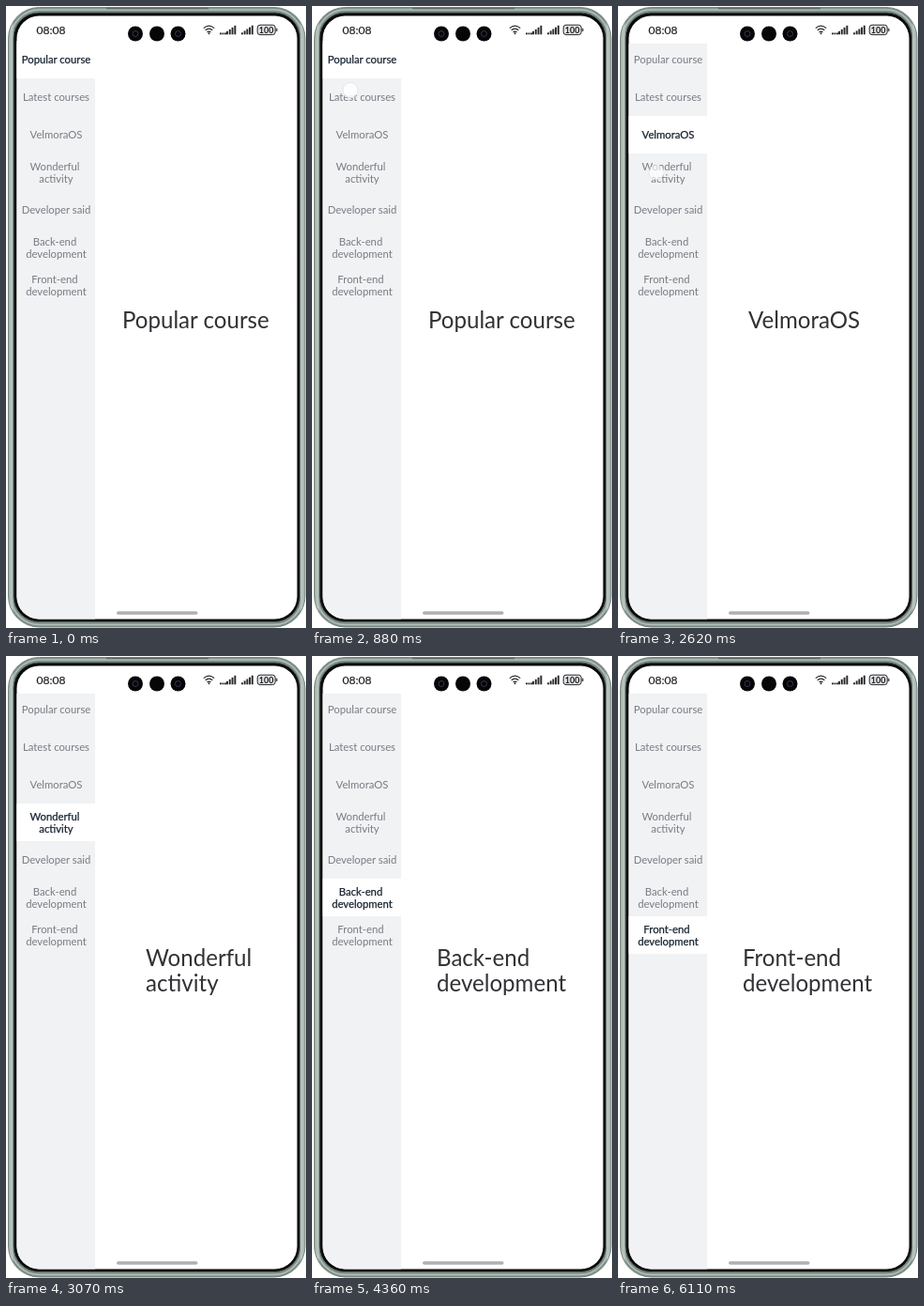
Write an HTML page that moves like this. It is 320 px wide and 662 px high and loops after 6230 ms.

```html
<!DOCTYPE html>
<html lang="en">
<head>
<meta charset="utf-8">
<title>Vertical tabs</title>
<style>
html, body { margin: 0; width: 100%; height: 100%; overflow: hidden; background: #fff; }
svg { display: block; font-family: Lato, "Open Sans", sans-serif; }
.tab { font-size: 11.3px; text-anchor: middle; fill: #777c82; }
.tab.on { fill: #182431; stroke: #182431; stroke-width: .25px; }
.title { font-size: 24.1px; fill: #303235; }
</style>
</head>
<body>
<svg id="stage" width="320" height="662" viewBox="0 0 320 662">
  <defs>
    <linearGradient id="metal">
      <stop offset="0" stop-color="#9eaaa4"/>
      <stop offset=".012" stop-color="#c2ccc7"/>
      <stop offset=".02" stop-color="#7f8f88"/>
      <stop offset=".98" stop-color="#7f8f88"/>
      <stop offset=".988" stop-color="#c2ccc7"/>
      <stop offset="1" stop-color="#9eaaa4"/>
    </linearGradient>
    <clipPath id="screen"><rect x="11.5" y="10.5" width="299" height="642" rx="24"/></clipPath>
  </defs>

  <rect x="2.5" y="1.5" width="316.5" height="659.5" rx="33" fill="url(#metal)" stroke="#75857e"/>
  <rect x="5.5" y="4" width="310.5" height="654.5" rx="30" fill="none" stroke="#b5c1bb" stroke-width="1.5"/>
  <rect x="8" y="7" width="305.5" height="648.5" rx="27" fill="#090b0a" stroke="#56625c"/>
  <path d="M107 2.5H216" stroke="#59655f" stroke-width="1.5"/>

  <g clip-path="url(#screen)">
    <rect x="11" y="10" width="300" height="643" fill="#fff"/>
    <rect x="11" y="40" width="84" height="613" fill="#f0f2f4"/>
    <rect id="mark" x="11" width="84" height="40" fill="#fff"/>
    <g id="tabs"></g>
    <g id="titles"></g>
    <circle id="touch" cx="41" r="8" fill="#fff" fill-opacity=".88" stroke="#dfe1e4" stroke-width=".8"/>
    <rect x="118" y="644.3" width="86.5" height="3.4" rx="1.7" fill="#aeb0b4"/>
  </g>

  <text x="32.5" y="30" font-size="12.1" fill="#202224" stroke="#202224" stroke-width=".2">08:08</text>
  <g fill="#050607">
    <circle cx="138" cy="29.5" r="8"/>
    <circle cx="161" cy="29.5" r="8"/>
    <circle cx="183.5" cy="29.5" r="8"/>
  </g>
  <g fill="none" stroke="#3b3550" stroke-width="1">
    <circle cx="138" cy="29.5" r="3"/>
    <circle cx="183.5" cy="29.5" r="3"/>
  </g>
  <g fill="none" stroke="#25272a" stroke-width="1.2">
    <path d="M210.8 23.6Q216.5 18.6 222.2 23.6M212.7 25.8Q216.5 22.4 220.3 25.8M214.5 27.9Q216.5 26.2 218.5 27.9"/>
    <rect x="268.2" y="20.2" width="19" height="10.4" rx="2.8" stroke-width="1" fill="#e2e4e6"/>
    <path d="M288.8 23.8V27"/>
  </g>
  <circle cx="216.5" cy="29.3" r="1" fill="#25272a"/>
  <g id="bars" fill="#25272a"></g>
  <text x="277.7" y="28.8" font-size="9" font-weight="700" text-anchor="middle" fill="#1c1e20">100</text>
</svg>
<script>
const LOOP = 6230, PITCH = 40;
const $ = id => document.getElementById(id);

// lines of each tab, time it becomes selected, time the finger lands, left edge of its title
const items = [
  { lines: ["Popular course"], at: 0, x: 124 },
  { lines: ["Latest courses"], at: 920, tap: 880, x: 125 },
  { lines: ["VelmoraOS"], at: 1790, x: 139 },
  { lines: ["Wonderful", "activity"], at: 2700, tap: 2620, x: 149 },
  { lines: ["Developer said"], at: 3570, tap: 3490, x: 124 },
  { lines: ["Back-end", "development"], at: 4360, tap: 4320, x: 133 },
  { lines: ["Front-end", "development"], at: 5190, tap: 5110, x: 133 }
];

function add(parent, tag, attrs, text = "") {
  const el = document.createElementNS("http://www.w3.org/2000/svg", tag);
  for (const k in attrs) el.setAttribute(k, attrs[k]);
  el.textContent = text;
  parent.appendChild(el);
  return el;
}

items.forEach((item, i) => {
  const n = item.lines.length;
  item.tab = add($("tabs"), "g", { class: "tab" });
  item.title = add($("titles"), "g", { class: "title" });
  item.lines.forEach((line, k) => {
    const row = k - (n - 1) / 2;
    add(item.tab, "text", { x: k < n - 1 ? 52 : 53.5, y: 61 + PITCH * i + row * 13 }, line);
    add(item.title, "text", { x: item.x, y: 343 + row * 27 }, line);
  });
});

function bars(x, count, step, heights) {
  for (let i = 0; i < count; i++) {
    const h = heights(i);
    add($("bars"), "rect", { x: x + i * step, y: 30.3 - h, width: 1.9, height: h });
  }
}
bars(228, 3, 2.5, () => 1.8);
bars(235, 4, 2.8, i => 3.5 + i * 2);
bars(251, 5, 2.7, i => 2 + i * 1.9);

function draw(t) {
  let sel = 0;
  items.forEach((item, i) => { if (t >= item.at) sel = i; });
  items.forEach((item, i) => {
    item.tab.setAttribute("class", i === sel ? "tab on" : "tab");
    item.title.style.display = i === sel ? "" : "none";
  });
  $("mark").setAttribute("y", 37 + PITCH * sel);

  const hit = items.findIndex(item => t >= item.tap && t < item.at);
  $("touch").style.display = hit < 0 ? "none" : "";
  if (hit >= 0) {
    $("touch").setAttribute("cy", 49.5 + PITCH * hit + (hit > 1 ? 7.5 : 0));
    $("touch").setAttribute("opacity", hit === 3 ? .7 : 1);
  }
}

const start = performance.now();
function tick(now) {
  draw(Math.max(0, now - start) % LOOP);
  requestAnimationFrame(tick);
}
draw(0);
requestAnimationFrame(tick);
</script>
</body>
</html>
```
